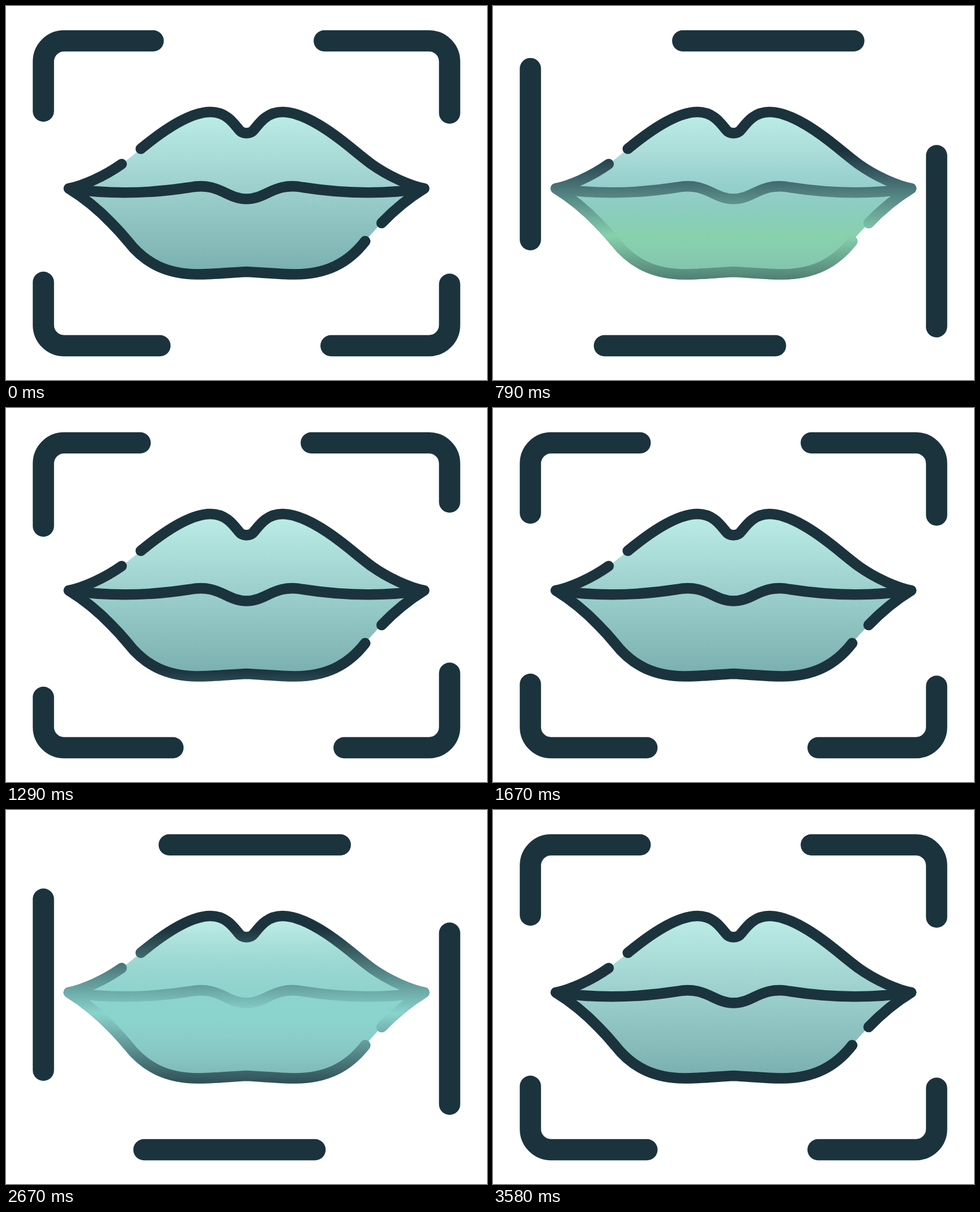
An HTML page for the animation above (4 s loop, 849 by 660 pixels).

```html
<!DOCTYPE html>
<html lang="en">
<head>
<meta charset="utf-8">
<title>Lip scan</title>
<style>
  html, body { margin: 0; width: 100%; height: 100%; overflow: hidden; background: #fff; }
  svg { display: block; width: 100vw; height: 100vh; }
  .ink { fill: none; stroke: var(--ink); stroke-width: 18.6; stroke-linecap: round; stroke-linejoin: round; }
  .skin { fill: var(--skin); }
  .lips { --ink: #1b333d; --skin: url(#skin); }
  .matte { --ink: #fff; --skin: #fff; }
</style>
</head>
<body>
<svg viewBox="0 0 849 660">
  <defs>
    <linearGradient id="skin" gradientUnits="userSpaceOnUse" x1="0" y1="187" x2="0" y2="474">
      <stop stop-color="#bcede7"/>
      <stop offset="1" stop-color="#79afaf"/>
    </linearGradient>
    <linearGradient id="glow" gradientUnits="userSpaceOnUse" x1="0" y1="-150" x2="0" y2="150">
      <stop id="tail" stop-opacity="0"/>
      <stop id="core" offset=".5"/>
      <stop id="head" offset="1" stop-opacity="0"/>
    </linearGradient>
    <g id="mouth">
      <path class="skin" d="M111 322C136 317 173 301 204 279C216 270 227 261 238 252C272 224 322 187 361 187
        C389 187 402 207 411 218C417 226.5 432 226.5 438 218C447 207 460 187 488 187C527 187 577 224 611 252
        C622 261 633 270 645 279C676 301 713 317 738 322C712 338 686 359 663 383C653 393 643 404 634 415
        C603 455 564 473 511 473.5C483 473.5 454 470.5 424.5 469C395 470.5 366 473.5 338 473.5
        C285 473 246 455 215 415C206 404 196 393 186 383C163 359 137 338 111 322Z"/>
      <path class="ink" d="M204 279C173 301 136 317 111 322C137 338 163 359 186 383C196 393 206 404 215 415
        C246 455 285 473 338 473.5C366 473.5 395 470.5 424.5 469C454 470.5 483 473.5 511 473.5
        C564 473 603 455 634 415"/>
      <path class="ink" d="M238 252C272 224 322 187 361 187C389 187 402 207 411 218C417 226.5 432 226.5 438 218
        C447 207 460 187 488 187C527 187 577 224 611 252C622 261 633 270 645 279C676 301 713 317 738 322
        C712 338 686 359 663 383"/>
      <path class="ink" d="M111 322C185 333 255 331 325 320C365 312 385 331 404 337C417 341.5 432 341.5 445 337
        C464 331 484 312 524 320C594 331 664 333 738 322"/>
    </g>
    <mask id="matte" maskUnits="userSpaceOnUse" x="0" y="0" width="849" height="660">
      <use href="#mouth" class="matte"/>
    </mask>
  </defs>
  <path id="frame" fill="none" stroke="#1b333d" stroke-width="37.5" stroke-linecap="round" stroke-dasharray="302"
    d="M783 98V563A36.5 36.5 0 0 1 746.5 599.5H102.5A36.5 36.5 0 0 1 66 563V98A36.5 36.5 0 0 1 102.5 61.5H746.5A36.5 36.5 0 0 1 783 98"/>
  <use href="#mouth" class="lips"/>
  <g mask="url(#matte)"><rect id="band" width="849" height="300" fill="url(#glow)"/></g>
</svg>
<script>
  const LOOP = 4000, STEP = LOOP / 96;
  const TEAL = [138, 212, 205], GREEN = [134, 208, 160], BLUE = [140, 200, 226];
  const $ = id => document.getElementById(id);
  const clamp = v => Math.min(1, Math.max(0, v));
  const mix = (a, b, k) => `rgb(${a.map((v, i) => Math.round(v + (b[i] - v) * k))})`;

  // cubic-bezier(1/3, 0, 0, 1)
  function ease(x) {
    let lo = 0, hi = 1;
    for (let i = 0; i < 30; i++) {
      const s = (lo + hi) / 2;
      if (s * (1 - s) ** 2 + s ** 3 < x) lo = s; else hi = s;
    }
    return lo * lo * (3 - 2 * lo);
  }

  function draw(ms) {
    const n = Math.floor((ms % LOOP + 4) / STEP) % 96;
    const first = n < 48;
    const x = clamp((n - (first ? 10 : 56)) / 30);
    const p = x === 1 ? 1 : x && ease(x);

    $('frame').setAttribute('stroke-dashoffset', 211 - 604 * p);

    const y = 27 + 607 * p;
    $('glow').setAttribute('gradientTransform', `translate(0 ${y})`);
    $('band').setAttribute('y', y - 150);
    $('band').setAttribute('visibility', p > 0 && p < 1 ? 'visible' : 'hidden');

    // the first pass turns from teal to green
    const k = first ? clamp((p - .2) / .6) : 0;
    $('tail').setAttribute('stop-color', mix(TEAL, BLUE, k));
    $('core').setAttribute('stop-color', mix(TEAL, GREEN, k));
    $('head').setAttribute('stop-color', mix(TEAL, GREEN, k));
  }

  function tick() {
    draw(performance.now());
    requestAnimationFrame(tick);
  }
  tick();
</script>
</body>
</html>
```
